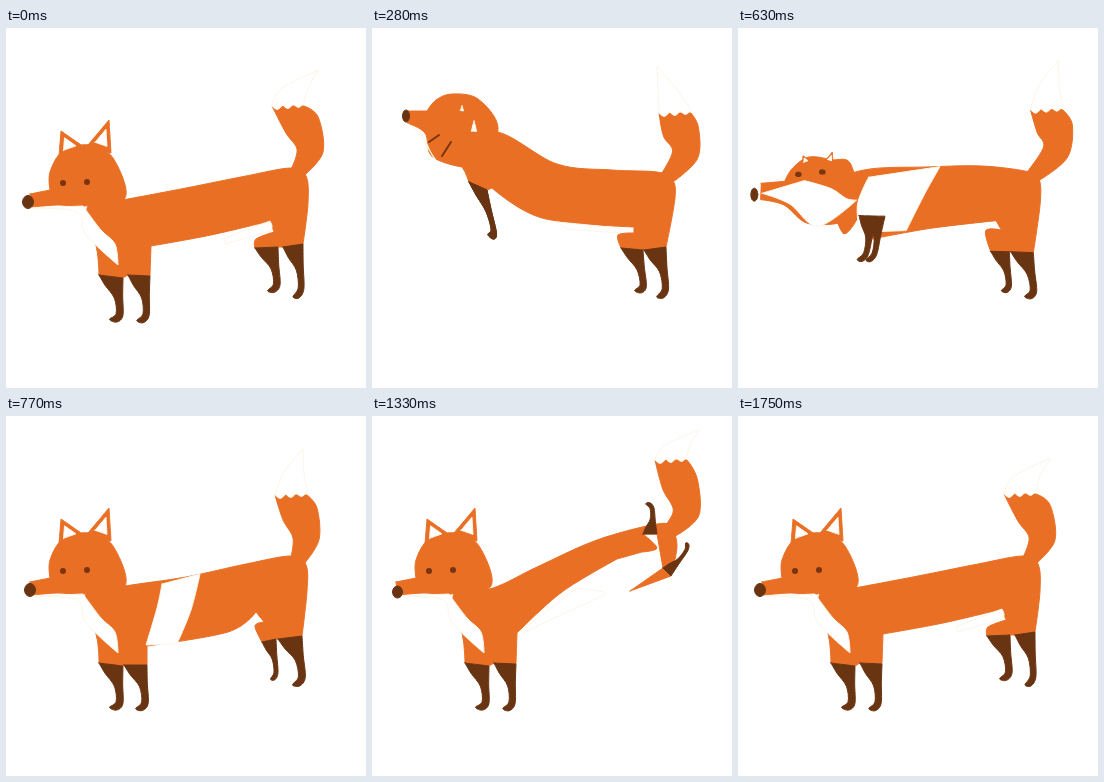
An HTML page for the animation above (1820 ms loop, 360 by 360 pixels).

```html
<!DOCTYPE html>
<html lang="en">
<head>
<meta charset="utf-8">
<title>Rolling fox</title>
<style>
html, body { margin: 0; width: 100%; height: 100%; overflow: hidden; background: #fff; }
svg { display: block; width: 100vw; height: 100vh; }
path { stroke-linejoin: round; stroke-linecap: round; stroke-width: 1; }
.fur { fill: #e96f25; stroke: #e96f25; }
.sock { fill: #693412; stroke: #693412; }
.eye { fill: none; stroke: #78350f; }
.white { fill: #fff; stroke: #fcf6e6; }
</style>
</head>
<body>
<svg id="stage" viewBox="0 0 360 360"></svg>
<script>
const STEP = 70, STEPS = 26;

// Points are "x,y"; "!" marks a sharp corner.
const parse = text => text.split(' ').map(p => {
  const [x, y] = p.split(',').map(parseFloat);
  return { x, y, corner: p.endsWith('!') };
});
const sharp = p => ({ ...p, corner: true });
const mix = (a, b, t) => ({ x: a.x + (b.x - a.x) * t, y: a.y + (b.y - a.y) * t, corner: a.corner });
const move = (p, dx, dy) => ({ x: p.x + dx, y: p.y + dy });

// Closed smooth curve through the points.
function curve(pts) {
  const at = i => pts[(i + pts.length) % pts.length];
  const slope = (i, k) => at(i).corner ? 0 : (at(i + 1)[k] - at(i - 1)[k]) / 6;
  return pts.reduce((d, a, i) => {
    const b = at(i + 1);
    return d + `C${a.x + slope(i, 'x')} ${a.y + slope(i, 'y')} ` +
      `${b.x - slope(i + 1, 'x')} ${b.y - slope(i + 1, 'y')} ${b.x} ${b.y}`;
  }, `M${pts[0].x} ${pts[0].y}`) + 'Z';
}

// Front of the body: head, bib, ears, eyes, front legs. Rear: belly, back, hind legs, tail.
const rest = {
  head: '24,166! 44,162! 44,144 57,123 84,117 107,130 119,170 78,178 52,177 26,179!',
  nose: '22,174 5.5,6.5',
  earL: '53,128 55,103 78,119', earR: '82,117 103,92 105,125',
  eyeL: '57,155 57,155', eyeR: '81,154 81,154',
  bib: '28,180! 77,178! 95,202 109,216 112,237! 80,207 71,184',
  chest: '91,222',
  legA: '93,247 117,250 106,293', legB: '122,247 144,248 133,294',
  belly: '145,218! 205,207 264,193!', haunch: '268,204! 250,211',
  back: '302,175 300,148 285,140 240,148 180,160 122,171 82,178',
  legC: '249,220 272,219 264,264', legD: '277,219 297,216 289,270', heel: '285,190',
  band: '219,210! 264,193! 266,198 265,203! 219,216! 219,213',
  tail: '291,145 304,123 296,97 282,78 313,42'
};
const leap = {
  ...rest,
  head: '36,83 55,83 64,72 80,66 106,71 126,100 108,138 62,130 53,105 35,95',
  nose: '34,88 3.5,6',
  earL: '87,84 90,74 93,85', earR: '97,106 102,86 107,107',
  eyeL: '57,114 67,107', eyeR: '70,128 79,114',
  bib: '36,96 46,102 53,112 60,127 64,132 56,120 48,105',
  chest: '94,146',
  legA: '97,154 115,162 118,209', legB: '97,154 115,162 118,209',
  belly: '120,160 170,190 262,199', haunch: '262,205 246,207',
  back: '303,170 300,151 285,144 240,142 185,136 125,104 85,120',
  legC: '249,220 271,222 265,264', legD: '272,222 294,219 287,270',
  band: '185,194 247,200 248,203 248,205 195,201 188,196',
  tail: '295,150 313,127 309,104 303,85 285,38'
};
const leapOver = { ...leap, bib: '38,83 64,72 80,66 106,71 124,95 90,67 60,78' };
const roll = {
  ...leap,
  head: '23,150 48,149 60,138 78,132 98,139 116,140 118,195 70,205 43,177 21,168',
  nose: '20.5,158 2.5,6.5',
  earL: '85,165 85,165 85,165', earR: '85,165 85,165 85,165',
  eyeL: '57,194 57,199', eyeR: '73,198 74,203',
  bib: '22,158 61,140 92,140 108,148 122,140 80,194 42,172',
  chest: '112,197',
  legA: '135,158 150,158 128,203', legB: '135,158 150,158 128,203',
  belly: '124,203 175,193 262,191', haunch: '266,200 247,199',
  back: '303,173 301,151 290,145 245,133 195,128 130,128 100,150',
  legC: '251,222 272,224 265,264', legD: '273,224 295,227 289,270',
  band: '118,140 206,129 186,155 167,190 112,192 104,168',
  tail: '295,149 316,123 314,101 310,81 317,32'
};
const sweep = { ...roll, nose: '12.5,163 2.5,6.5', tail: '296,150 326,125 328,102 320,83 332,32' };
const sweepOver = {
  ...sweep,
  earL: '70,140 70,140 70,140', earR: '90,140 90,140 90,140',
  eyeL: '61,142 63,142', eyeR: '85,139 87,139'
};
const twist = {
  ...rest,
  nose: '24,174 5.5,6.5',
  legB: '118,249 141,249 132,294',
  belly: '141,230 222,216 250,196', haunch: '258,206 249,210',
  back: '301,175 300,149 285,140 240,148 180,161 119,170 80,178',
  legC: '256,226 270,223 266,264', legD: '272,223 296,220 289,270',
  band: '156,168 194,158 185,194 171,228 140,229 151,192',
  tail: '291,146 300,123 294,98 285,79 297,33'
};
const crouch = {
  ...twist,
  nose: '27.5,174 5.5,6',
  eyeL: '60,154 60,154', eyeR: '83,154 83,154',
  legB: '119,248 143,248 134,293',
  belly: '143,234 233,211 266,205', haunch: '266,217 247,217',
  back: '304,185 300,164 285,156 240,157 180,165 122,173 80,178',
  legC: '245,227 266,230 264,265', legD: '265,229 288,229 287,270',
  band: '160,170 198,161 188,190 176,227 141,232 152,198',
  tail: '294,162 316,138 309,115 296,96 327,64'
};
const kick = {
  ...rest,
  nose: '25.5,176 5,6',
  belly: '145,217 190,176 245,143', haunch: '270,136 285,132',
  back: '305,130 299,112 285,108 225,124 165,151 121,172 82,178',
  legC: '271,118 285,118 275,87', legD: '291,152 299,160 315,127', heel: '258,175',
  band: '150,214 205,172 232,176 230,180 150,217 150,215',
  tail: '297,116 314,97 308,68 299,44 327,14'
};

const timeline = [
  [0, rest], [4, leap], [4.01, leapOver], [7, roll], [8, sweep], [8.01, sweepOver],
  [11, twist], [15, crouch], [19, kick], [25, rest], [STEPS, rest]
].map(([step, pose]) => ({
  step,
  pose: Object.fromEntries(Object.entries(pose).map(([name, text]) => [name, parse(text)]))
}));

function poseAt(step) {
  const next = timeline.findIndex(k => k.step > step);
  const from = timeline[next - 1], to = timeline[next], t = (step - from.step) / (to.step - from.step);
  const corners = timeline[0].pose;
  return Object.fromEntries(Object.keys(rest).map(name => [name, from.pose[name].map((p, i) =>
    ({ ...mix(p, to.pose[name][i], t), corner: corners[name][i].corner }))]));
}

// Unit sock with its top edge from 0 to 1, fitted to a leg's top corners and foot.
const sock = parse('0,0! 1,0! .97,.4 .96,.85 .7,1.01 .4,.97 .68,.82 .62,.48 .25,.22');
const leg = ([left, right, foot]) => {
  const mid = mix(left, right, .5);
  return curve(sock.map(p => ({
    x: left.x + (right.x - left.x) * p.x + (foot.x - mid.x) * p.y,
    y: left.y + (right.y - left.y) * p.x + (foot.y - mid.y) * p.y,
    corner: p.corner
  })));
};
const hip = ([left, right]) => [sharp(left), sharp(right)];

const torso = p => curve([
  ...p.chest, ...hip(p.legA), ...hip(p.legB), ...p.belly, ...p.haunch,
  ...hip(p.legC), ...hip(p.legD), ...p.back
]);

const tailWidths = [7, 13, 18, 16];

// Sides of the tail at equal distance from its middle line.
function tail({ tail: line }) {
  const side = sign => tailWidths.map((w, i) => {
    const a = line[Math.max(i - 1, 0)], b = line[i + 1], last = i === 3;
    const len = Math.hypot(b.x - a.x, b.y - a.y);
    const nx = last ? -1 : (b.y - a.y) / len, ny = last ? 0 : (a.x - b.x) / len;
    return { ...move(line[i], sign * w * nx, sign * w * ny), corner: last || i === 0 };
  });
  return curve([...side(1), ...side(-1).reverse()]);
}

// White tip: a scalloped edge, then two sides that bow with the bend.
function tailTip({ tail: line }) {
  const [join, tip] = line.slice(3), bend = tip.x - join.x;
  const left = move(join, -16, 1), right = move(join, 16, -2);
  const edge = Array.from({ length: 7 }, (_, i) =>
    ({ ...move(mix(left, right, i / 6), 0, i % 2 ? 3 : -1), corner: i % 2 === 0 }));
  return curve([
    ...edge, move(mix(right, tip, .5), -bend * .1, 0),
    sharp(tip), move(mix(left, tip, .5), -Math.max(0, bend) * .45, 0)
  ]);
}

const ear = (pts, size) => {
  const center = mix(mix(pts[0], pts[1], .5), pts[2], 1 / 3);
  return curve(pts.map(p => sharp(mix(center, p, size))));
};

const nose = ([c, r]) => curve(Array.from({ length: 8 }, (_, i) =>
  move(c, r.x * Math.cos(i * Math.PI / 4), r.y * Math.sin(i * Math.PI / 4))));

// A round eye thins out as it stretches into a line.
const eye = ([a, b], path) => {
  path.style.strokeWidth = Math.max(2, 6 - .6 * Math.hypot(b.x - a.x, b.y - a.y));
  return `M${a.x} ${a.y}L${b.x} ${b.y + .01}`;
};

// Drawn back to front.
const parts = [
  ['fur', tail],
  ['white', tailTip],
  ['fur', torso],
  ['fur', p => curve([sharp(p.heel[0]), ...hip(p.legD)])],
  ['fur', p => ear(p.earL, 1)],
  ['fur', p => ear(p.earR, 1)],
  ['fur', p => curve(p.head)],
  ['white', p => ear(p.earL, .5)],
  ['white', p => ear(p.earR, .52)],
  ['white', p => curve(p.band)],
  ['white', p => curve(p.bib)],
  ['eye', (p, path) => eye(p.eyeL, path)],
  ['eye', (p, path) => eye(p.eyeR, path)],
  ['sock', p => nose(p.nose)],
  ...['legA', 'legB', 'legC', 'legD'].map(name => ['sock', p => leg(p[name])])
].map(([kind, outline]) => {
  const path = document.createElementNS('http://www.w3.org/2000/svg', 'path');
  path.setAttribute('class', kind);
  document.getElementById('stage').append(path);
  return { path, outline };
});

function draw() {
  const pose = poseAt(Math.floor(performance.now() / STEP) % STEPS);
  for (const { path, outline } of parts) path.setAttribute('d', outline(pose, path));
  requestAnimationFrame(draw);
}
draw();
</script>
</body>
</html>
```
